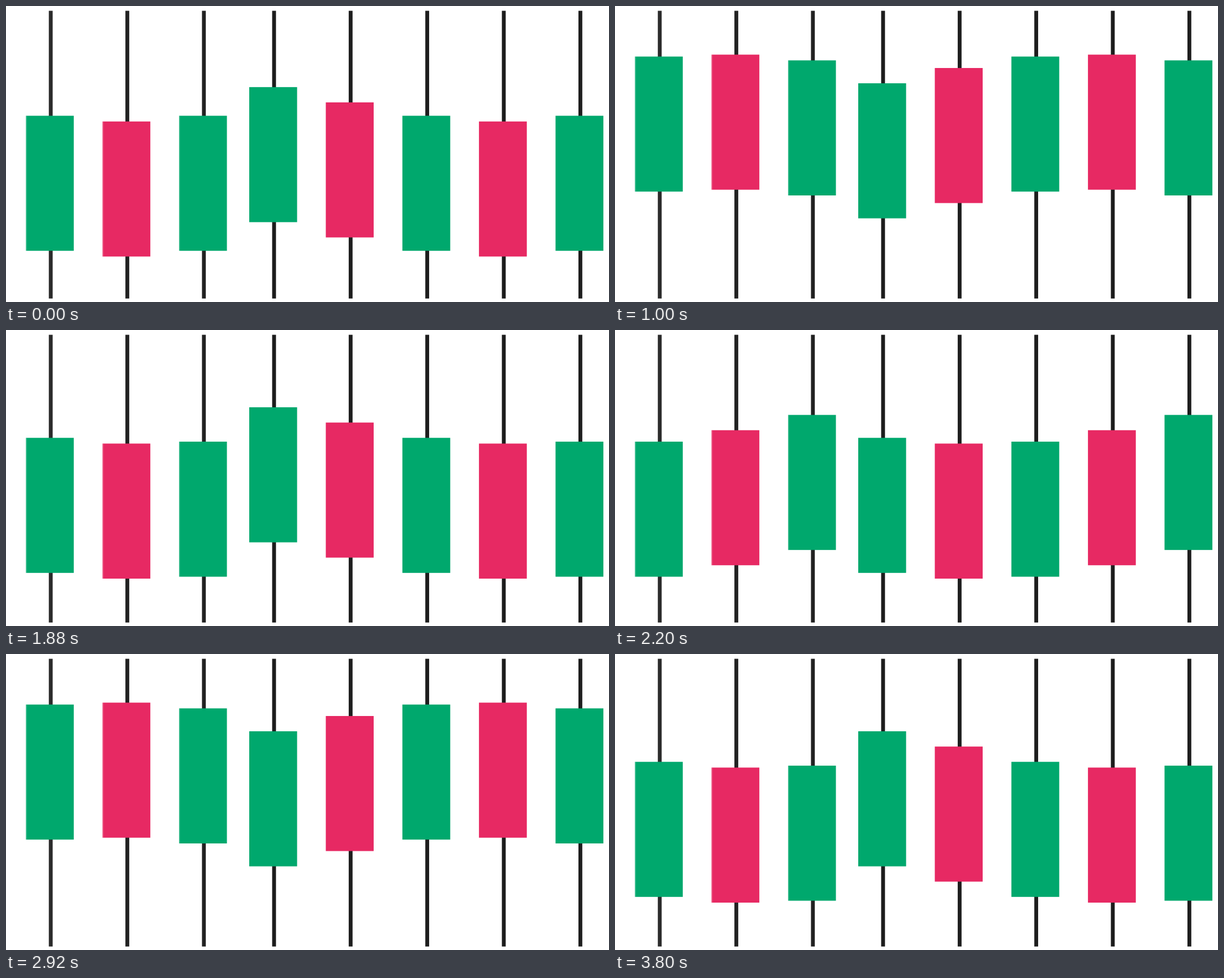
An HTML page that plays this animation: 1066 by 525 pixels, repeating every 3840 ms.

```html
<!DOCTYPE html>
<html lang="en">
<head>
<meta charset="utf-8">
<title>Candlesticks</title>
<style>
  html, body { margin: 0; width: 100%; height: 100%; overflow: hidden; background: #fff; }
  svg { display: block; width: 1066px; height: 525px; }
</style>
</head>
<body>
<svg id="chart" viewBox="0 0 1066 525"></svg>
<script>
const STEP = 40, STEPS = 96, CYCLE = 48;
const UNIT = 525 / 155, PITCH = 135.37;
const MID = 42, SWING = 18;
const GREEN = '#00a86d', RED = '#e72963';
const chart = document.getElementById('chart');

function rect(x, y, width, height, fill, parent = chart) {
  const el = document.createElementNS('http://www.w3.org/2000/svg', 'rect');
  const attrs = { x, y, width, height, fill };
  for (const key in attrs) el.setAttribute(key, attrs[key]);
  parent.append(el);
  return el;
}

// Five candles repeat; the row begins with the third of them.
const candles = Array.from({ length: 8 }, (_, i) => {
  const kind = (i + 2) % 5;
  const x = i < 3 ? 35.2 + i * PITCH : 430 + (i - 3) * PITCH;
  const wick = i === 0 ? '#2b2b2b' : i < 3 ? '#222' : '#1d1d1d';
  rect(x + 40.5, 8.5, 6.8, 510.3, wick);

  const body = document.createElementNS('http://www.w3.org/2000/svg', 'g');
  chart.append(body);
  rect(x, 0, 84.6, 70.72 * UNIT, kind === 1 || kind === 3 ? RED : GREEN, body);
  if (i < 3) rect(x, 0, 1.8, 70.72 * UNIT, 'rgba(255,255,255,.2)', body);
  return { body, phase: kind * Math.PI / 6 };
});

function draw(time) {
  const step = Math.floor(time / STEP) % STEPS;
  for (const { body, phase } of candles) {
    const shift = Math.trunc(SWING * Math.sin(2 * Math.PI * step / CYCLE + phase));
    body.setAttribute('transform', `translate(0 ${(MID + shift + 0.47) * UNIT})`);
  }
}

const start = performance.now();
function tick() {
  draw(performance.now() - start);
  requestAnimationFrame(tick);
}
tick();
</script>
</body>
</html>
```
